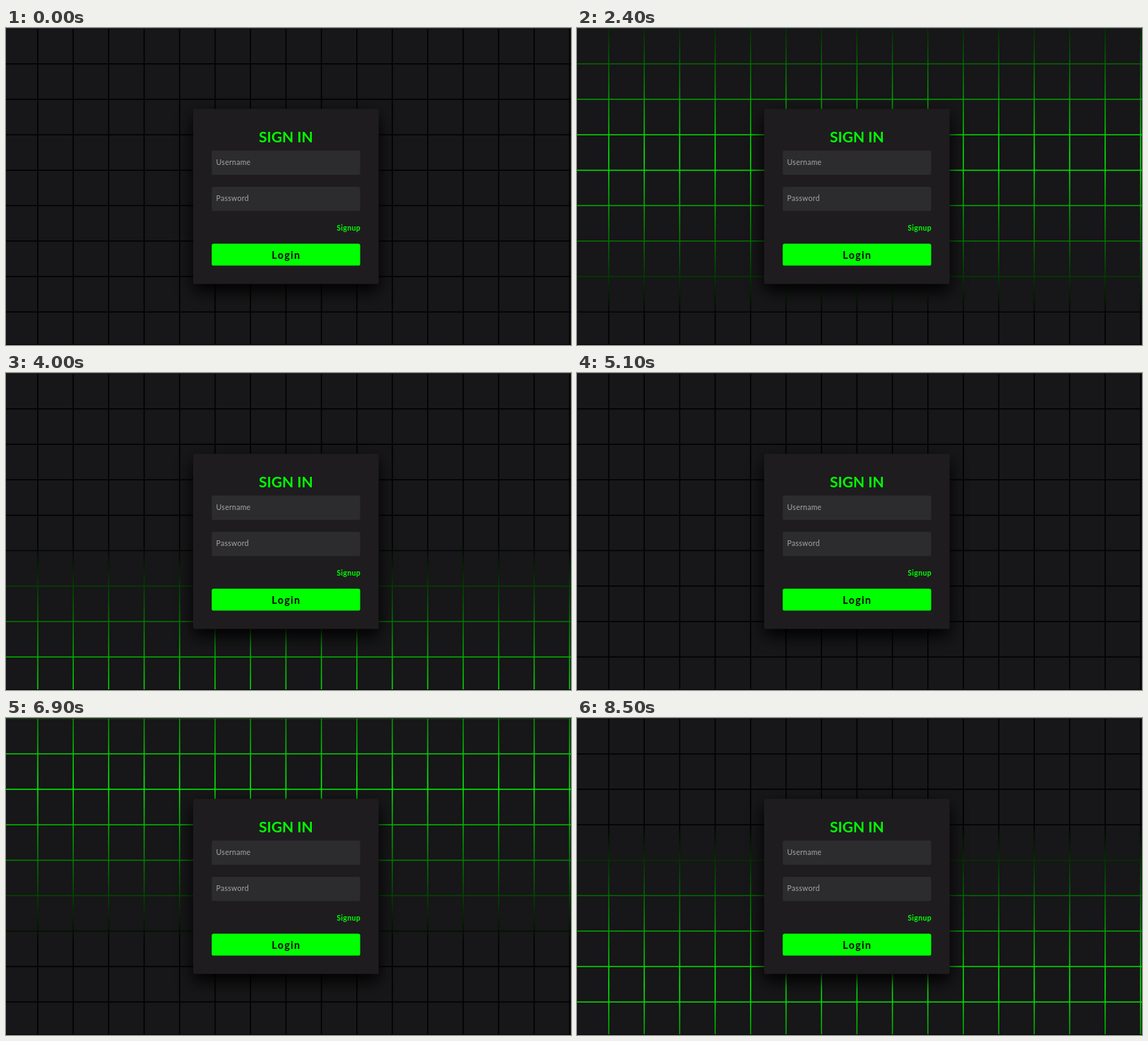
An HTML page for the animation above (8.6 s loop, 800 px wide and 449 px high).

```html
<!DOCTYPE html>
<html lang="en">
<head>
<meta charset="utf-8">
<title>Sign in</title>
<style>
  html, body { margin: 0; width: 100%; height: 100%; overflow: hidden; background: #000; }
  svg { display: block; width: 100vw; height: 100vh; }
  text { font-family: Quicksand, Lato, sans-serif; }
  .bold { font-weight: 700; }
  .field { fill: #2c2b2d; }
  .hint { fill: #a6a6a6; font-size: 10.5px; letter-spacing: .27px; }
</style>
</head>
<body>
<svg viewBox="0 0 800 449">
  <defs>
    <linearGradient id="glow" x1="0" y1="0" x2="0" y2="1">
      <stop offset="0" stop-color="#000"/>
      <stop offset=".5" stop-color="#0f0"/>
      <stop offset="1" stop-color="#000"/>
    </linearGradient>
    <filter id="shadow" x="-30%" y="-30%" width="160%" height="170%" color-interpolation-filters="sRGB">
      <feDropShadow dx="0" dy="9.9" stdDeviation="11.5" flood-color="#000"/>
    </filter>
  </defs>

  <rect width="800" height="449"/>
  <rect id="beam" width="800" fill="url(#glow)"/>
  <path id="tiles" fill="#171618"/>
  <rect width="800" height="1" fill="#2c2c2c"/>
  <rect y="448" width="800" height="1" fill="#070707"/>

  <rect x="265" y="114.5" width="262.6" height="248" rx="2.6" fill="#1e1c1f" filter="url(#shadow)"/>
  <text class="bold" x="396.3" y="161.6" font-size="21" text-anchor="middle" fill="#0f0">SIGN IN</text>

  <rect class="field" x="291.3" y="173.6" width="210.2" height="34.4" rx="2.6"/>
  <text class="hint" x="297.6" y="194">Username</text>
  <rect class="field" x="291.3" y="224.9" width="210.2" height="34.4" rx="2.6"/>
  <text class="hint" x="297.6" y="245.2">Password</text>

  <text class="bold" x="502" y="286.6" font-size="10.5" letter-spacing=".35" text-anchor="end" fill="#0f0">Signup</text>
  <rect x="291.3" y="305.5" width="210.2" height="31" rx="2.6" fill="#0f0"/>
  <text class="bold" x="396.9" y="326.6" font-size="14.2" letter-spacing="1.4" text-anchor="middle">Login</text>
</svg>
<script>
  const LOOP = 8600, STEP = 100;
  const SWEEP = 5000, DELAY = 145;
  const TOP = 1.5, HEIGHT = 448;
  const PITCH = 50.2, GAP = 1.5;

  const beam = document.getElementById('beam');
  beam.setAttribute('height', HEIGHT);

  const side = PITCH - GAP;
  let outline = '';
  for (let row = 0; row < 9; row++) {
    for (let col = -1; col < 16; col++) {
      const x = 45 + col * PITCH + GAP / 2;
      const y = 0.6 + row * PITCH + GAP / 2;
      outline += `M${x} ${y}h${side}v${side}h${-side}z`;
    }
  }
  document.getElementById('tiles').setAttribute('d', outline);

  // The beam slides from one height above the stage to one below it.
  function draw(time) {
    const t = Math.floor((time % LOOP) / STEP) * STEP - DELAY;
    const progress = t < 0 ? 0 : (t % SWEEP) / SWEEP;
    beam.setAttribute('y', TOP + HEIGHT * (2 * progress - 1));
  }

  const start = performance.now();
  function tick() {
    draw(performance.now() - start);
    requestAnimationFrame(tick);
  }
  tick();
</script>
</body>
</html>
```
